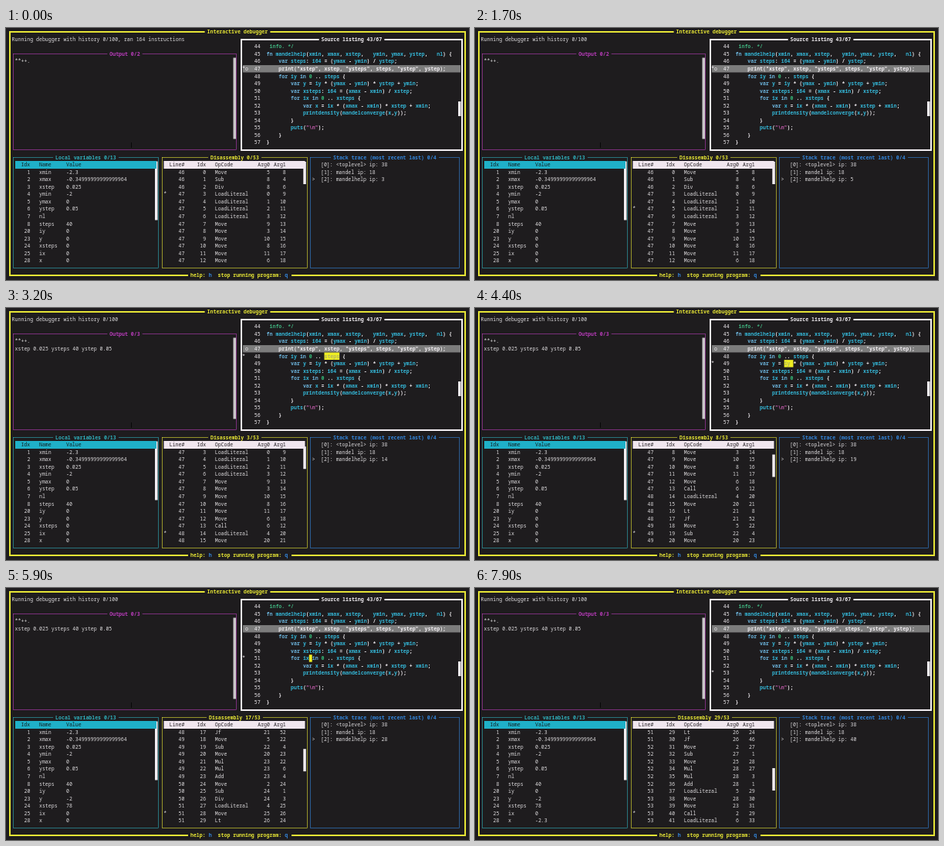
These frames come from a looping animation (600 by 326 pixels, 8000 ms). An HTML page with a canvas:

```html
<!DOCTYPE html>
<html>
<head>
<meta charset="utf-8">
<title>Interactive debugger</title>
<style>
html, body { margin: 0; width: 100%; height: 100%; overflow: hidden; background: #1e1c1e; }
canvas { display: block; }
</style>
</head>
<body>
<canvas id="stage" width="600" height="326"></canvas>
<script>
const g = document.getElementById('stage').getContext('2d');
const W = 3.94, ROW = 9.55, CODE_X = 337.6;
const BG = '#1e1c1e', TEXT = '#dcdadc', WHITE = '#f2eef2', YELLOW = '#e6e535',
      MAGENTA = '#b83cba', CYAN = '#2fb0bc', BLUE = '#3486dc';

const source = [
  ' info. */',
  'fn mandelhelp(xmin, xmax, xstep,   ymin, ymax, ystep,   nl) {',
  '    var steps: i64 = (ymax - ymin) / ystep;',
  '    print("xstep", xstep, "ysteps", steps, "ystep", ystep);',
  '    for iy in 0 .. steps {',
  '        var y = iy * (ymax - ymin) * ystep + ymin;',
  '        var xsteps: i64 = (xmax - xmin) / xstep;',
  '        for ix in 0 .. xsteps {',
  '            var x = ix * (xmax - xmin) * xstep + xmin;',
  '            printdensity(mandelconverge(x,y));',
  '        }',
  '        puts("\\n");',
  '    }',
  '}'
];

// Each group: source line, then its instructions.
const program = `46:Move 5 8,Sub 8 4,Div 8 6
47:LoadLiteral 0 9,LoadLiteral 1 10,LoadLiteral 2 11,LoadLiteral 3 12,Move 9 13,Move 3 14,Move 10 15,Move 8 16,Move 11 17,Move 6 18,Call 6 12
48:LoadLiteral 4 20,Move 20 21,Lt 21 8,Jf 21 52
49:Move 5 22,Sub 22 4,Move 20 23,Mul 23 22,Mul 23 6,Add 23 4
50:Move 2 24,Sub 24 1,Div 24 3
51:LoadLiteral 4 25,Move 25 26,Lt 26 24,Jf 26 46
52:Move 2 27,Sub 27 1,Move 25 28,Mul 28 27,Mul 28 3,Add 28 1
53:LoadLiteral 5 29,Move 28 30,Move 23 31,Call 2 29,LoadLiteral 6 33`
  .split('\n').flatMap(group => {
    const [line, ops] = group.split(':');
    return ops.split(',').map(op => [line, ...op.split(' ')]);
  });

const rowY = r => 5 + ROW * r;

function text(s, x, r, color = TEXT, weight = 400) {
  g.font = `${weight} ${W / 0.6}px "Noto Sans Mono", "DejaVu Sans Mono", monospace`;
  g.fillStyle = color;
  g.fillText(s, x, rowY(r) + 2.2);
}
const right = (s, x, r, color) => text(s, x - String(s).length * W, r, color);

function rect(x, y, w, h, color) {
  g.fillStyle = color;
  g.fillRect(x, y, w, h);
}

function panel(x0, x1, r0, r1, color, title, width = 0.6) {
  const snap = r => width < 1 ? Math.floor(rowY(r)) + 0.5 : Math.round(rowY(r));
  const y = snap(r0), w = title.length * W, x = (x0 + x1 - w) / 2;
  g.strokeStyle = color;
  g.lineWidth = width;
  g.strokeRect(x0, y, x1 - x0, snap(r1) - y);
  rect(x - 3, y - 3, w + 6, 6, BG);
  text(title, x, r0, color, 700);
}

function tokenColor(token) {
  if (/^(fn|var|for|in)$/.test(token)) return '#6cb4dc';
  if (/^\d/.test(token)) return '#35b878';
  if (token[0] === '"') return '#c05aa8';
  return /^\w/.test(token) ? '#34b4d4' : WHITE;
}

function codeLine(s, r, plain) {
  for (const m of s.matchAll(/"[^"]*"|\w+|[^\s\w"]+/g))
    text(m[0], CODE_X + m.index * W, r, plain || tokenColor(m[0]), 600);
}

// Column and length of the marked expression.
function markAt(ip) {
  if (ip < 14 || ip > 36) return null;
  if (ip < 18) return [19, 5];
  if (ip < 24) return [16, 3];
  if (ip < 27) return null;
  return ip < 31 ? [14, 1] : [15, 1];
}

function ipAt(t) {
  if (t < 1100) return 3;
  if (t < 1600) return 4;
  if (t < 3200) return Math.min(14, Math.floor(5 + (t - 1600) * 0.006));
  return Math.max(14, Math.floor(19 + (t - 4333) * 0.006));
}

function drawOutput(ip) {
  const printed = ip > 13;
  text('Running debugger with history 0/100' + (ip < 4 ? ', ran 164 instructions' : ''), 7.6, 1);
  panel(9.5, 298.5, 3, 16, MAGENTA, 'Output 0/' + (printed ? 3 : 2));
  text('**++.', 11.6, 4);
  if (printed) text('xstep 0.025 ysteps 40 ystep 0.05', 11.6, 5);
  rect(294.5, 38.5, 3.5, 105, '#c9c5c9');
  rect(162, 148, 1, 7, '#080808');
}

function drawSource(ip) {
  panel(305, 591, 1, 16, WHITE, 'Source listing 43/67', 2);
  const current = +program[ip][0];
  source.forEach((s, i) => {
    const line = 44 + i, r = 2 + i, stop = line === 47;
    if (stop) rect(307, rowY(r) - 4.7, 282, 9.4, '#7c7c7c');
    if (line === current) text('*', 306, r, WHITE);
    if (stop) text('o', 310, r, WHITE);
    text(line, 321.8, r, WHITE);
    codeLine(s, r, stop ? WHITE : i ? '' : '#3fae7c');
    const mark = line === current && markAt(ip);
    if (mark) {
      const x = CODE_X + mark[0] * W;
      rect(x, rowY(r) - 4.7, mark[1] * W, 9.4, '#eeee22');
      text(s.substr(...mark), x, r, '#b4b460', 600);
    }
  });
  rect(586, 95, 3.5, 19, WHITE);
}

function drawLocals(ip) {
  panel(9.5, 197.5, 17, 32, CYAN, 'Local variables 0/13');
  rect(193, 172.5, 3.5, 76, WHITE);
  rect(12, 172, 183, 10, '#1fb0c8');
  text('Idx', 19.4, 18, '#102024');
  text('Name', 43, 18, '#102024');
  text('Value', 78, 18, '#102024');
  const xmax = '-0.34999999999999964';
  const xsteps = ip < 25 ? 0 : ip < 26 ? xmax : ip < 27 ? '1.9500000000000002' : 78;
  [
    [1, 'xmin', -2.3], [2, 'xmax', xmax], [3, 'xstep', 0.025],
    [4, 'ymin', -2], [5, 'ymax', 0], [6, 'ystep', 0.05],
    [7, 'nl', ''], [8, 'steps', 40], [20, 'iy', 0],
    [23, 'y', ip < 24 ? 0 : -2], [24, 'xsteps', xsteps],
    [25, 'ix', 0], [28, 'x', ip < 37 ? 0 : -2.3]
  ].forEach(([idx, name, value], i) => {
    right(idx, 31.4, 19 + i);
    text(name, 43, 19 + i);
    text(value, 78, 19 + i);
  });
}

function drawDisassembly(ip) {
  const top = Math.max(0, ip - 11);
  panel(202.5, 390.5, 17, 32, YELLOW, `Disassembly ${top}/53`);
  rect(385.3, 173 + top * 2.07, 3.5, 29, WHITE);
  rect(204.5, 172, 183, 10, '#f0e6ee');
  const cells = (line, idx, op, a, b, r, color) => {
    right(line, 231.4, r, color);
    right(idx, 259.2, r, color);
    text(op, 270.7, r, color);
    right(a, 342, r, color);
    right(b, 362.8, r, color);
  };
  cells('Line#', 'Idx', 'OpCode', 'Arg0', 'Arg1', 18, '#242024');
  for (let i = 0; i < 13; i++) {
    const idx = top + i, [line, op, a, b] = program[idx];
    if (idx === ip) text('*', 204.2, 19 + i);
    cells(line, idx, op, a, b, 19 + i);
  }
}

function drawStack(ip) {
  panel(394.5, 587.5, 17, 32, BLUE, 'Stack trace (most recent last) 0/4');
  text('[0]: <toplevel> ip: 38', 408, 18);
  text('[1]: mandel ip: 18', 408, 19);
  text('>', 396.4, 20);
  text('[2]: mandelhelp ip: ' + ip, 408, 20);
}

function drawFrame() {
  panel(5, 595, 0, 33, YELLOW, 'Interactive debugger', 2);
  rect(236, 316, 134, 9, BG);
  text('help:', 239, 33, YELLOW, 700);
  text('h', 262.8, 33, BLUE, 700);
  text('stop running program:', 274.6, 33, YELLOW, 700);
  text('q', 361.3, 33, BLUE, 700);
}

const start = performance.now();

function draw() {
  const ip = ipAt((performance.now() - start) % 8000);
  rect(0, 0, 600, 326, BG);
  drawFrame();
  drawOutput(ip);
  drawSource(ip);
  drawLocals(ip);
  drawDisassembly(ip);
  drawStack(ip);
  requestAnimationFrame(draw);
}
draw();
</script>
</body>
</html>
```
